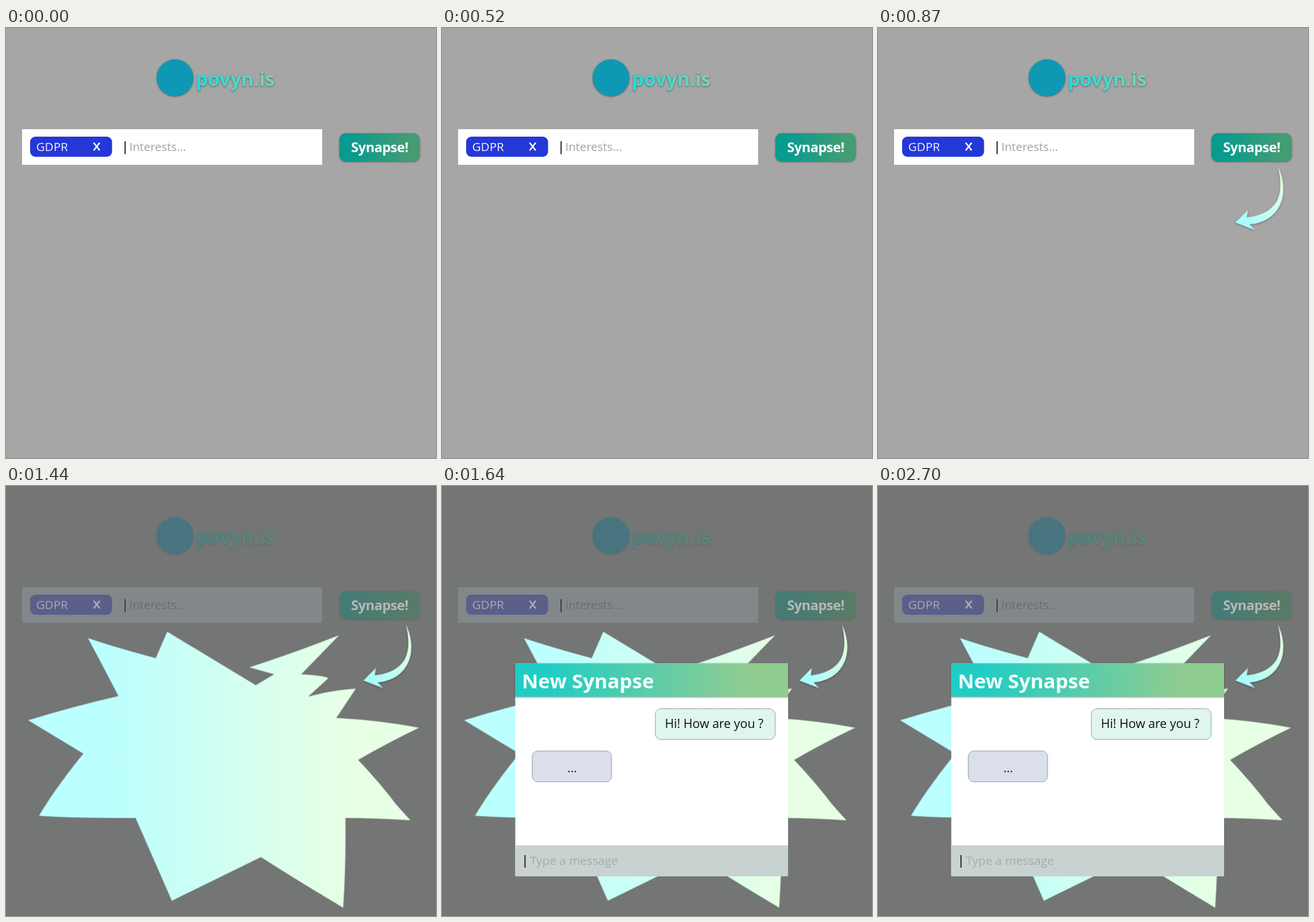
Animation of 748 by 748 pixels, one loop 3.41 s. Source, as an HTML page:

```html
<!DOCTYPE html>
<html lang="en">
<head>
<meta charset="utf-8">
<title>Shared interests chat</title>
<style>
  html, body { margin: 0; width: 100%; height: 100%; overflow: hidden; background: #a6a6a6; }
  svg { display: block; width: 100vw; height: 100vh; }
  text { font: 20.7px "Open Sans", "Noto Sans", sans-serif; }
  .bold { font-weight: 700; }
  .shadow { filter: drop-shadow(0 1px 1.5px rgba(0, 0, 0, .45)); }
  #dim .shadow { filter: drop-shadow(0 1px 1.5px rgba(0, 0, 0, .15)); }
  .later { opacity: 0; }
  .bubble { stroke: #333b3b; stroke-width: 1; stroke-dasharray: 1.5 1.5; }
</style>
</head>
<body>
<svg viewBox="0 0 748 748">
  <defs>
    <linearGradient id="glow" gradientUnits="userSpaceOnUse" x1="170" y1="0" x2="585" y2="0">
      <stop stop-color="#bbffff"/><stop offset="1" stop-color="#e6ffe5"/>
    </linearGradient>
    <linearGradient id="sweep" gradientUnits="userSpaceOnUse" x1="632" y1="345" x2="702" y2="275">
      <stop stop-color="#a5fcff"/><stop offset="1" stop-color="#e3ffe2"/>
    </linearGradient>
    <linearGradient id="header" gradientUnits="userSpaceOnUse" x1="180" y1="0" x2="530" y2="0">
      <stop stop-color="#20cdc5"/><stop offset="1" stop-color="#90cc90"/>
    </linearGradient>
  </defs>

  <g id="light"></g>
  <g id="dim" class="later"></g>

  <path id="burst" class="later" transform="translate(.5 .5)" fill="url(#glow)" d="M142 264Q182 278 260 299L280 253
    L434 346L466 327L423 315Q506 288 579 259L513 327Q558 330 560 334L525 366Q570 354 608 352L574 403
    Q650 407 718 420Q660 448 612 476Q650 516 677 552Q692 569 703 581Q640 577 590 577Q591 660 586 733
    Q510 688 443 645L288 721L225 577Q100 577 57 573Q84 527 134 465L38 407Q120 382 195 365Q180 335 142 264Z"/>

  <path id="arrow" class="later shadow" transform="translate(.5 .5)" fill="url(#sweep)" d="M695 240C706 262 708 288 699 307
    C689 329 667 340 646 341L655 351L621 338L643 316L641 329C668 326 686 315 694 299C702 282 700 260 695 240Z"/>

  <g id="chat" class="later">
    <path fill="#fff" d="M127.500 308.500h474.500v370.500h-474.500z"/>
    <path class="shadow" fill="url(#header)" d="M127.500 308.500h474.500v58h-474.500z"/>
    <text class="bold" x="139" y="351.500" fill="#f2fffc" style="font-size:34.8px">New Synapse</text>
    <rect class="bubble" x="371" y="387.500" width="208.500" height="53.500" rx="10" fill="#dff6ef"/>
    <text x="387.700" y="421" fill="#111" style="font-size:21.3px">Hi! How are you ?</text>
    <rect class="bubble" x="157" y="461" width="138" height="53.500" rx="10" fill="#dbdfec"/>
    <text x="226.500" y="498" fill="#111" text-anchor="middle">...</text>
    <path fill="#c8d2d0" d="M127.500 625h474.500v54h-474.500z"/>
    <path fill="#111" d="M143.500 642h1.800v22h-1.800z"/>
    <text x="153" y="659" fill="#a3adab">Type a message</text>
  </g>
</svg>

<script>
const LOOP = 3410;
const $ = id => document.getElementById(id);

const gradient = (id, x1, x2, [from, to]) => `
  <linearGradient id="${id}" gradientUnits="userSpaceOnUse" x1="${x1}" y1="0" x2="${x2}" y2="0">
    <stop stop-color="${from}"/><stop offset="1" stop-color="${to}"/>
  </linearGradient>`;

const page = (key, c) => `
  <defs>
    ${gradient(key + 'Word', 335, 465, c.word)}
    ${gradient(key + 'Button', 600, 700, c.button)}
  </defs>
  <path fill="${c.back}" d="M0 0h748v748h-748z"/>
  <circle class="shadow" cx="294" cy="86.500" r="32" fill="${c.mark}"/>
  <text class="bold shadow" x="330" y="101" fill="url(#${key}Word)" style="font-size:33.4px">povyn.is</text>
  <path fill="${c.input}" d="M28 176h522v62h-522z"/>
  <rect x="42" y="189" width="142.500" height="35" rx="9" fill="${c.tag}"/>
  <text x="52.500" y="214" fill="${c.tagText}">GDPR</text>
  <path d="M152.500 199.500l10.500 13.500m0 -13.500l-10.500 13.500" stroke="${c.cross}" stroke-width="2.500"/>
  <path fill="${c.cursor}" d="M206.300 197h1.800v22.500h-1.800z"/>
  <text x="214.500" y="214" fill="${c.hint}" style="font-size:20.3px">Interests...</text>
  <rect class="shadow" x="580" y="183" width="139.500" height="49" rx="11" fill="url(#${key}Button)"/>
  <text class="bold" x="650" y="215.500" text-anchor="middle" fill="${c.buttonText}"
    style="font-size:23.6px;letter-spacing:-.5px">Synapse!</text>`;

$('light').innerHTML = page('light', {
  back: '#a6a6a6', mark: '#0f98b4', word: ['#1fdde0', '#7cd3ac'],
  input: '#fff', tag: '#2438d8', tagText: '#f0f2ff', cross: '#fff',
  cursor: '#111', hint: '#a3a3a3', button: ['#089b8f', '#449c74'], buttonText: '#fff'
});

$('dim').innerHTML = page('dim', {
  back: '#737675', mark: '#47747f', word: ['#478583', '#5e8773'],
  input: '#82878a', tag: '#5a608a', tagText: '#a6a8ac', cross: '#b0b1b4',
  cursor: '#2f3131', hint: '#696d6f', button: ['#467b75', '#587b68'], buttonText: '#b5b9b7'
});

const cues = { arrow: 870, dim: 1440, burst: 1440, chat: 1640 };
for (const [id, at] of Object.entries(cues)) {
  $(id).animate([
    { opacity: 0, offset: 0, easing: 'step-end' },
    { opacity: 1, offset: at / LOOP },
    { opacity: 1, offset: 1 }
  ], { duration: LOOP, iterations: Infinity });
}
</script>
</body>
</html>
```
